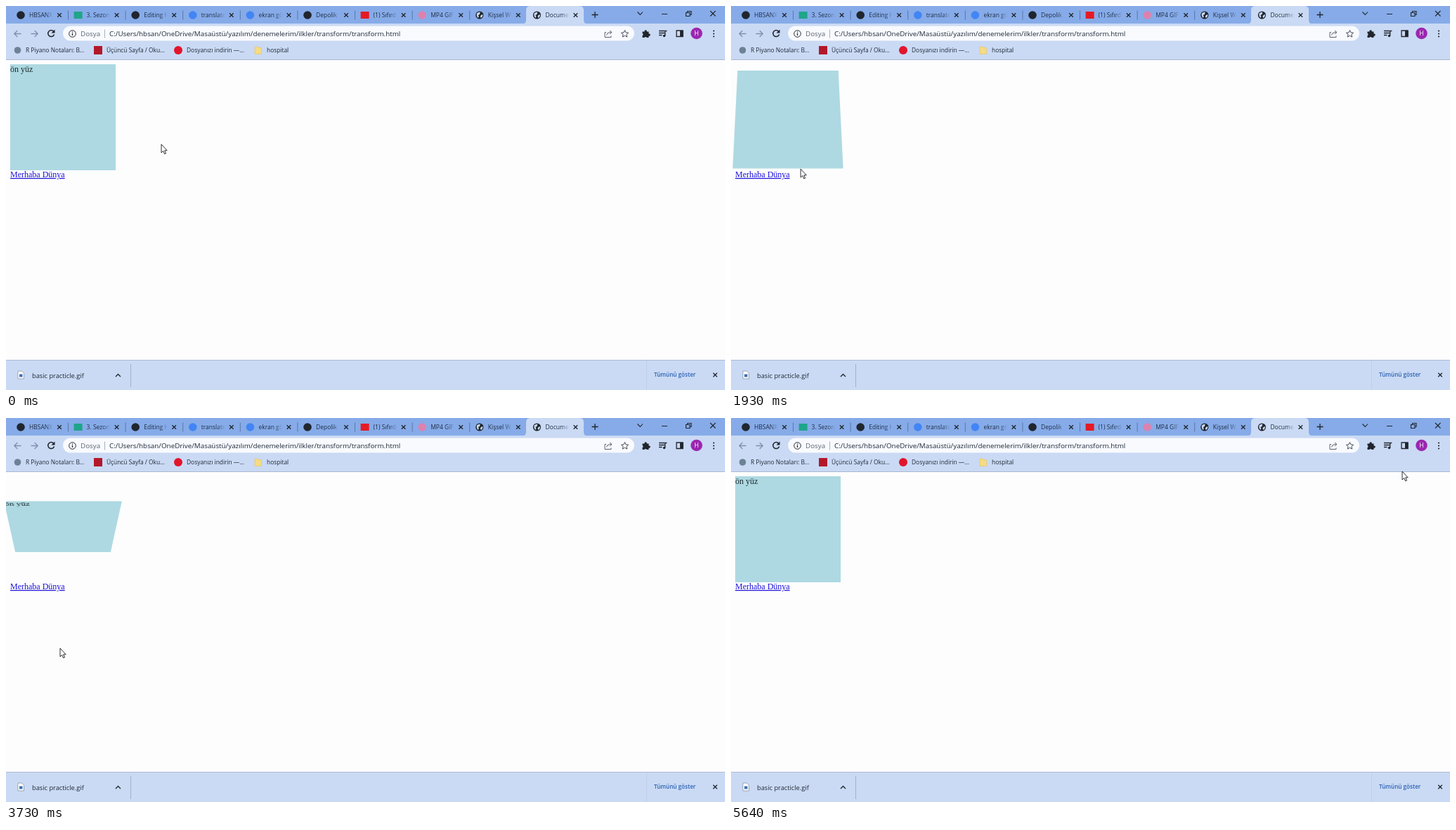
An HTML page for the animation above (5.68 s loop, 1023 by 547 pixels).

```html
<!DOCTYPE html>
<html lang="tr">
<head>
<meta charset="utf-8">
<style>
html, body { margin: 0; width: 100%; height: 100%; overflow: hidden; background: #fdfdfd; }
svg { position: absolute; left: 0; top: 0; }
text { font-family: "Open Sans", sans-serif; fill: #1f2937; white-space: pre; }
.serif { font: 12px "Liberation Serif", serif; }
.line { fill: none; stroke: #20252c; stroke-width: 1.3; }
#view { position: absolute; left: 6px; top: 83px; width: 150px; height: 151px; perspective: 630px; }
#card { width: 100%; height: 100%; background: #aed9e2; color: #1c2a2e; line-height: 14px; transform-style: preserve-3d; }
#card span { display: block; backface-visibility: hidden; }
</style>
</head>
<body>
<svg width="1023" height="547">
  <defs>
    <linearGradient id="fade" gradientUnits="userSpaceOnUse" x1="35" x2="46" y1="0" y2="0">
      <stop stop-color="#1f2c44"/><stop offset="1" stop-color="#1f2c44" stop-opacity="0"/>
    </linearGradient>
    <g id="x"><path class="line" d="M-2.8-2.8 2.8 2.8M2.8-2.8-2.8 2.8"/></g>
    <g id="globe">
      <circle r="5.6" fill="#20262e"/>
      <path d="M-4-2.5Q-1-5 1-4L0-1-2 0-1 2-2 4Q-4.5 2-4-2.5M2 0 4.4-1Q5 2 2 4L1 2z" fill="#cbd9f2"/>
    </g>
  </defs>
  <rect width="1023" height="26" fill="#86abe8"/>
  <rect y="25" width="1023" height="51" fill="#cadaf4"/>
  <path d="M735 25.5Q740 25 740 20V6Q740 0 746 0H816Q822 0 822 6V20Q822 25 827 25.5z" fill="#cadaf4"/>
  <rect y="76" width="1023" height="1" fill="#a9b8cf"/>
  <rect y="504" width="1023" height="43" fill="#cadaf4"/>
  <rect y="504" width="1023" height="1" fill="#abbad2"/>
  <g id="tabs"></g>

  <!-- window buttons -->
  <path class="line" d="M833.5 12.5h9M838 8v9" stroke-width="1.5"/>
  <path class="line" d="M898.5 8.5 902.3 12.5 906 8.5M933 11.5h8M967.5 9.5h5.5v5h-5.5zM969.5 9.5v-2h5.5v5h-2M1002 7l7.5 7.5M1009.5 7l-7.5 7.5" style="stroke-width:1.1"/>

  <!-- toolbar -->
  <rect x="81" y="28.5" width="813" height="21" rx="10.5" fill="#f8fafe"/>
  <path class="line" d="M21.5 39.5H12M16.3 35 11.8 39.5 16.3 44M35.5 39.5H45M40.7 35 45.2 39.5 40.7 44" style="stroke:#7f8fae"/>
  <path class="line" d="M68 36.5A4.5 4.5 0 1 0 68.6 40.5" style="stroke-width:1.5"/>
  <path d="M69.5 33.5v5h-5z" fill="#20252c"/>
  <circle class="line" cx="94.5" cy="39.5" r="4.8" style="stroke-width:1"/>
  <path class="line" d="M94.5 38.7v3.3M94.5 36.5v1.2"/>
  <text x="106" y="43" font-size="9.8" style="fill:#5d6470">Dosya</text>
  <path d="M140.5 33.5v12" stroke="#aab2bf"/>
  <text x="147" y="43" font-size="9.83">C:/Users/hbsan/OneDrive/Masaüstü/yazılım/denemelerim/ilkler/transform/transform.html</text>
  <path class="line" d="M854 37.5h-2v7h9v-2M854.5 41.5q.5-4 5-4h2M859 35l3 2.5-3 2.5" style="stroke:#5b6370;stroke-width:1"/>
  <path class="line" d="M880.5 34.5l1.5 3.3 3.6.4-2.7 2.4.8 3.5-3.2-1.8-3.2 1.8.8-3.5-2.7-2.4 3.6-.4z" style="stroke:#434a55;stroke-width:1"/>
  <path d="M905.5 36.5h3a1.7 1.7 0 1 1 3.2 0h2.8v3a1.7 1.7 0 1 1 0 3.2v2.3h-3a1.6 1.6 0 0 0-3 0h-3v-3a1.6 1.6 0 0 0 0-3z" fill="#20252c"/>
  <path class="line" d="M929 35.5h8M929 38.5h8M929 41.5h4.5M937.8 42.5v-7h2.5"/>
  <circle cx="936.5" cy="42.5" r="1.7" fill="#20252c"/>
  <path class="line" d="M954 35h9v8.5h-9z"/>
  <path d="M959 35h4.5v9h-4.5z" fill="#20252c"/>
  <circle cx="982.5" cy="39" r="8.3" fill="#9c27b0"/>
  <text x="982.5" y="42" font-size="8.5" text-anchor="middle" style="fill:#fff">H</text>
  <path d="M1007 35.5v0M1007 39.5v0M1007 43.5v0" stroke="#20252c" stroke-width="2.2" stroke-linecap="round"/>

  <!-- bookmarks -->
  <circle cx="16.5" cy="63" r="4.8" fill="#6d8295"/>
  <rect x="125" y="57" width="12" height="12" fill="#b3182a"/>
  <circle cx="245" cy="63" r="6" fill="#e3152c"/>
  <path d="M354 58h4l1.5 1.5h4v9H354z" fill="#f5db83" stroke="#e2c266" stroke-width=".6"/>
  <g font-size="8.4">
    <text x="28" y="66">R Piyano Notaları: B...</text>
    <text x="143" y="66">Üçüncü Sayfa / Oku...</text>
    <text x="257" y="66">Dosyanızı indirin —...</text>
    <text x="371" y="66">hospital</text>
  </g>

  <!-- page link -->
  <text class="serif" x="6" y="244" text-decoration="underline" style="fill:#1c10dc">Merhaba Dünya</text>

  <!-- download bar -->
  <path d="M17 520h5.5l3 3v8H17z" fill="#fff" stroke="#8793a6" stroke-width=".8"/>
  <rect x="19" y="524.5" width="4.5" height="4" fill="#3f6fb4"/>
  <text x="37" y="529.5" font-size="9.27">basic practicle.gif</text>
  <path class="line" d="M156 528 159.5 524.5 163 528"/>
  <path d="M177.5 510v33" stroke="#9fb0cc"/>
  <path d="M911.5 505v42" stroke="#c0d0ea"/>
  <text x="922" y="528" font-size="8.1" font-weight="600" style="fill:#2c62b4">Tümünü göster</text>
  <use href="#x" x="1009" y="525.5"/>
</svg>
<div id="view"><div id="card" class="serif"><span>ön yüz</span></div></div>
<svg width="1023" height="547">
  <path id="cursor" d="M0 0V12L2.7 9.5 4.6 13.8 6.5 13 4.7 8.8H8.2z" fill="#fff" stroke="#15181c" stroke-width=".9"/>
</svg>
<script>
const $ = id => document.getElementById(id);
const disc = c => `<circle r="5.8" fill="${c}"/>`;
const box = c => `<rect x="-6" y="-5" width="12" height="10" fill="${c}"/>`;
const globe = '<use href="#globe"/>';

const tabs = [
  [disc("#20262e"), "HBSANX"], [box("#1fa58a"), "3. Sezon"], [disc("#20262e"), "Editing H"],
  [disc("#4285f4"), "translate"], [disc("#4285f4"), "ekran gö"], [disc("#20262e"), "Depolik"],
  [box("#e51a24"), "(1) Sıfırd"], [disc("#dc82ae"), "MP4 GIF"], [globe, "Kişsel W"], [globe, "Docume"]
];
$("tabs").innerHTML = tabs.map(([icon, name], i) =>
  `<g transform="translate(${21 + 81.6 * i} 13)">${icon}
  <text x="12" y="3" font-size="8.5" style="fill:url(#fade)">${name}</text>
  <use href="#x" x="55"/>${i < 8 ? '<path d="M67.5-6.5v13" stroke="#5878ac"/>' : ""}</g>`).join("");

const LOOP = 5680, FLIP = 1000;
// pointer: [ms, x, y]
const path = [[0, 221, 197], [1120, 221, 197], [1300, 116, 207], [1750, 106, 200], [2150, 90, 275],
  [2570, 67, 143], [3200, 68, 160], [3730, 77, 328], [4050, 77, 310], [4400, 79, 175],
  [4600, 82, 165], [5040, 1004, 44], [5640, 955, 76]];
// times when the pointer enters and leaves the card, in turn
const hovers = [1290, 1900, 2412, 3348, 4201, 4715];

// the CSS "ease" curve
function ease(x) {
  let lo = 0, hi = 1, s;
  for (let i = 0; i < 20; i++) {
    s = (lo + hi) / 2;
    if (0.75 * s * (1 - s) + s ** 3 < x) lo = s; else hi = s;
  }
  return 0.3 * s * (1 - s) ** 2 + 3 * s * s * (1 - s) + s ** 3;
}

// Each hover change turns the card from where it is, sooner done if the way is shorter.
function tilt(t) {
  let angle = 0;
  hovers.forEach((start, i) => {
    if (t <= start) return;
    const way = (i % 2 ? 0 : 180) - angle;
    const span = FLIP * Math.abs(way) / 180;
    const end = Math.min(t, hovers[i + 1] ?? LOOP);
    angle += way * ease(Math.min(1, (end - start) / span));
  });
  return angle;
}

function pointer(t) {
  const n = path.findIndex(k => k[0] > t);
  if (n < 0) return path[path.length - 1].slice(1);
  const a = path[n - 1], b = path[n];
  const u = (t - a[0]) / (b[0] - a[0]), e = u * u * (3 - 2 * u);
  return [1, 2].map(i => a[i] + (b[i] - a[i]) * e);
}

function draw(now) {
  const t = now % LOOP;
  $("cursor").setAttribute("transform", `translate(${pointer(t)})`);
  $("card").style.transform = `rotateX(${-tilt(t)}deg)`;
  requestAnimationFrame(draw);
}
draw(performance.now());
</script>
</body>
</html>
```
